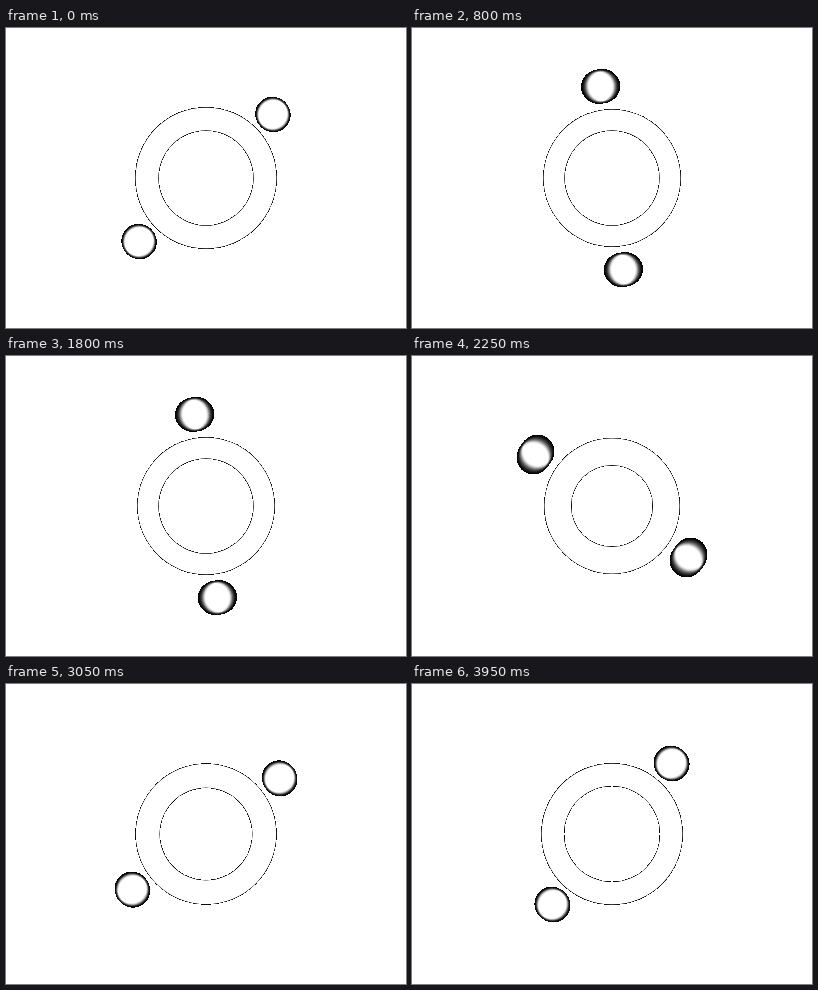
Write an HTML page with a canvas that moves like this. It is 400 px wide and 300 px high and loops after 4 s.

```html
<!DOCTYPE html>
<html>
<head>
<meta charset="utf-8">
<title>Orbiting balls</title>
<style>
  html, body { margin: 0; width: 100%; height: 100%; overflow: hidden; background: #fff; }
  canvas { display: block; }
</style>
</head>
<body>
<canvas id="stage" width="400" height="300"></canvas>
<script>
const ctx = document.getElementById('stage').getContext('2d', { willReadFrequently: true });
const CX = 200, CY = 150, ORBIT = 92.3, BALL = 17.6, SOFT = 3;
const STEP = 50, TICKS = 20, CYCLE = 19;
const SAMPLES = 17, SHUTTER = 0.25, CUTOFF = 0.06;

// Smooth curve through [time, value] keys; each cycle adds `gain`.
function curve(keys, gain) {
  const n = keys.length;
  const key = i => {
    const turn = Math.floor(i / n), k = keys[i - turn * n];
    return [k[0] + turn * CYCLE, k[1] + turn * gain];
  };
  const slope = (a, b) => (b[1] - a[1]) / (b[0] - a[0]);
  const tangent = i => {
    const a = key(i - 1), b = key(i), c = key(i + 1);
    const before = b[0] - a[0], after = c[0] - b[0];
    return (slope(a, b) * after + slope(b, c) * before) / (before + after);
  };
  return t => {
    let i = -1;
    while (key(i + 1)[0] <= t) i++;
    const a = key(i), b = key(i + 1), h = b[0] - a[0];
    const u = (t - a[0]) / h, v = 1 - u;
    return a[1] * (1 + 2 * u) * v * v + b[1] * u * u * (3 - 2 * u)
      + h * u * v * (tangent(i) * v - tangent(i + 1) * u);
  };
}

const turned = curve([[0, 0], [1, 6.4], [4, 56], [8, 152], [12, 255.2], [15, 306.4], [18, 353.7]], 360);
const outer = curve([[0, 70.6], [4, 68.6], [8, 65], [12, 67], [15, 68.6], [18, 70.6]], 0);
const inner = curve([[0, 47.5], [4, 41.5], [8, 41], [12, 46], [15, 47.5], [18, 48]], 0);

// White ball with a soft rim, thin enough to add up over all samples.
const ballFill = ctx.createRadialGradient(0, 0, BALL - SOFT, 0, 0, BALL);
ballFill.addColorStop(0, `rgba(255,255,255,${1 / SAMPLES})`);
ballFill.addColorStop(1, 'rgba(255,255,255,0)');

function drawRing(p) {
  ctx.fillStyle = '#fff';
  ctx.beginPath();
  ctx.arc(CX, CY, outer(p), 0, 2 * Math.PI);
  ctx.arc(CX, CY, inner(p), 0, 2 * Math.PI, true);
  ctx.fill();
}

// Sum the exposures of both balls while the shutter is open.
function drawBalls(p) {
  ctx.save();
  ctx.globalCompositeOperation = 'lighter';
  ctx.fillStyle = ballFill;
  for (let s = 0; s < SAMPLES; s++) {
    const time = p + SHUTTER * (s / (SAMPLES - 1) - 0.5);
    const angle = (turned(time) - 43.5) * Math.PI / 180;
    for (const side of [1, -1]) {
      ctx.setTransform(1, 0, 0, 1,
        CX + side * ORBIT * Math.cos(angle), CY + side * ORBIT * Math.sin(angle));
      ctx.fillRect(-BALL - 1, -BALL - 1, 2 * BALL + 2, 2 * BALL + 2);
    }
  }
  ctx.restore();
}

// Partial coverage turns dark; the faintest coverage becomes background.
function hardenEdges() {
  const image = ctx.getImageData(0, 0, 400, 300), d = image.data;
  for (let i = 0; i < d.length; i += 4) {
    const cover = d[i + 3] / 255;
    d[i] = d[i + 1] = d[i + 2] = cover < CUTOFF ? 255 : 255 * cover * cover;
    d[i + 3] = 255;
  }
  ctx.putImageData(image, 0, 0);
}

function draw(ms) {
  const tick = Math.floor(ms / STEP) % TICKS;
  const p = tick > 8 ? tick - 1 : tick; // one pose is held for two ticks
  ctx.clearRect(0, 0, 400, 300);
  drawRing(p);
  drawBalls(p);
  hardenEdges();
}

const start = performance.now();
function loop() {
  draw(performance.now() - start);
  requestAnimationFrame(loop);
}
loop();
</script>
</body>
</html>
```
